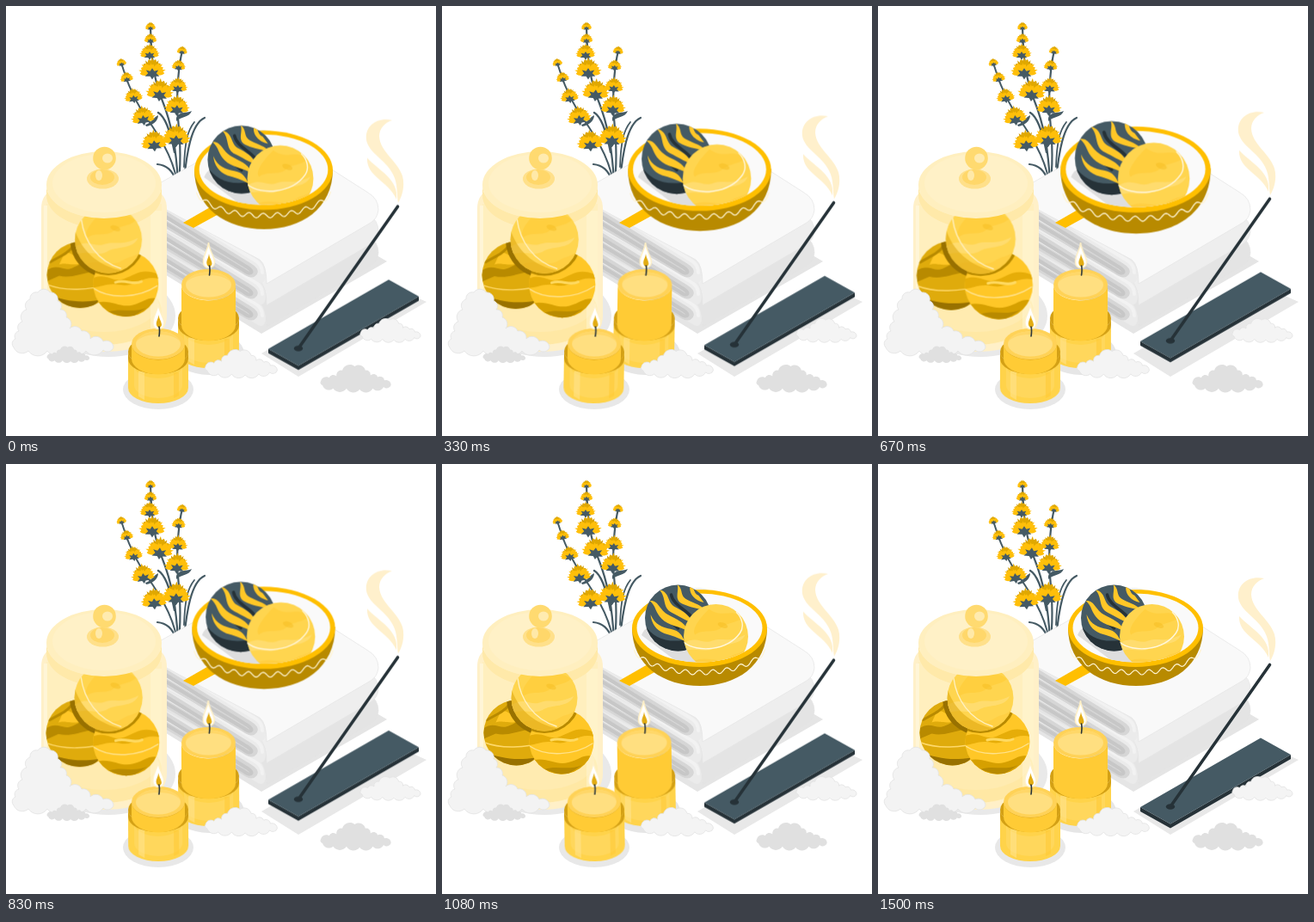
An HTML page that plays this animation: 500 px wide and 500 px high, repeating every 1.54 s.

```html
<!DOCTYPE html>
<html lang="en">
<head>
<meta charset="utf-8">
<title>Spa still life</title>
<style>
html, body { margin: 0; width: 100%; height: 100%; overflow: hidden; background: #fff; }
svg { display: block; width: 500px; height: 500px; }
#bowl { transform-origin: 299.5px 199px; }
#balls { transform-origin: 112.5px 294px; }
#tall { transform-origin: 235.5px 349px; }
#small { transform-origin: 177px 404px; }
</style>
</head>
<body>
<svg id="stage" viewBox="0 0 500 500" xmlns="http://www.w3.org/2000/svg"></svg>
<script>
const Y = '#ffc727', LIGHT = '#ffd54f', PALE = '#fff0c8', DARK = '#b88a00', SLATE = '#455a64', INK = '#263238';

const path = (d, fill, more = '') => `<path d="${d}" fill="${fill}" ${more}/>`;
const line = (d, color, w, more = '') =>
  path(d, 'none', `stroke="${color}" stroke-width="${w}" stroke-linecap="round" stroke-linejoin="round" ${more}`);
const oval = (x, y, rx, ry, fill, more = '') =>
  `<ellipse cx="${x}" cy="${y}" rx="${rx}" ry="${ry}" fill="${fill}" ${more}/>`;
const group = (id, body) => `<g id="${id}">${body}</g>`;

// Upright cylinder side, closed by half ellipses
const tube = (x, top, bottom, rx, ry, fill, more) =>
  path(`M${x - rx} ${top}V${bottom}A${rx} ${ry} 0 0 0 ${x + rx} ${bottom}V${top}A${rx} ${ry} 0 0 1 ${x - rx} ${top}Z`, fill, more);

// Sphere with its markings drawn around its own centre
const ball = (id, x, y, r, fill, marks) =>
  `<clipPath id="${id}"><circle r="${r}"/></clipPath>
   <g transform="translate(${x} ${y})"><circle r="${r}" fill="${fill}"/><g clip-path="url(#${id})">${marks}</g></g>`;

// Row of bumps through [dx, dy] steps
const cloud = (x, y, steps, fill, edge) =>
  path(`M${x} ${y}` + steps.map(([dx, dy]) => {
    const r = Math.hypot(dx, dy) * .6;
    return `a${r} ${r} 0 0 1 ${dx} ${dy}`;
  }).join('') + 'Z', fill, edge ? 'stroke="#e2e2e2" stroke-width=".8"' : '');

const flower = ([x, y, s, turn = 0]) => {
  const petal = (a, fill, k = 1) =>
    path('M0 0C-4-4-5-9-3-12L-1-11L0-14L1-11L3-12C5-9 4-4 0 0', fill, `transform="translate(0 6) rotate(${a}) scale(${k})"`);
  return `<g transform="translate(${x} ${y}) rotate(${turn}) scale(${s})">` +
    [-28, 26].map(a => petal(a, '#d19c00')).join('') + petal(0, '#e0a800', 1.12) +
    [-78, 76, -50, 48].map(a => petal(a, '#ffbf0a', .96)).join('') + petal(-8, '#ffbf0a', .72) +
    path('M0 12L-2 9L-7 9L-4 6L-6 3L-2 4L0 1L2 4L6 3L4 6L7 9L2 9Z', SLATE) + '</g>';
};

const lavender = () =>
  line('M168 25C169 65 173 88 181 108C194 140 198 170 200 204', SLATE, 2.2) +
  line('M134 66C139 82 145 101 158 122C176 148 193 172 199 204', SLATE, 2) +
  line('M205 52C200 72 199 94 199 120C202 150 204 175 201 204', SLATE, 2.2) +
  line('M207 203C210 172 215 137 231 130', SLATE, 2.2) +
  line('M207 187C208 158 211 145 219 135', SLATE, 1.8) +
  line('M198 203C193 191 187 185 176 184', SLATE, 2.2) +
  line('M196 170C191 145 184 128 177 124', SLATE, 2.4) +
  path('M198 130C202 122 209 125 216 122C213 130 204 128 198 134Z', SLATE) +
  path('M162 138C168 137 171 130 177 127C177 134 170 139 163 140Z', SLATE) +
  [[168, 23, .5], [168, 37, .6], [167, 52, .9], [170, 71, 1.2], [179, 96, 1.25, 4],
   [134, 65, .48, -10], [140, 82, .62, -10], [148, 103, .85, -8], [159, 126, 1.1, -8], [172, 155, 1.2, -4],
   [205, 51, .5, 8], [201, 68, .65, 6], [200, 91, .9, 4], [199, 114, 1.15, 3], [198, 149, 1.3, 2]].map(flower).join('');

const towel = (dy, face) => `<g transform="translate(0 ${dy})">` +
  path('M160 214L178 222L296 295Q303 301 302 312Q302 325 293 321L176 252Z', '#ebebeb') +
  line('M176 237L283 303Q291 308 288 310Q286 314 276 307L176 248', '#d6d6d6', 8) +
  line('M176 239L281 304Q287 308 285 310Q283 312 276 307L176 247', '#c7c7c7', 4) +
  line('M176 226L290 296Q298 301 298 310', '#f2f2f2', 4) +
  path('M166 226Q158 219 168 212L282 148Q300 140 316 150L421 217Q433 224 433 237Q432 247 424 252L303 323Q303 301 295 295Z',
    face, 'stroke="#e4e4e4" stroke-width=".7"') + '</g>';

const towels = () =>
  path('M165 300L297 381L443 297L426 287L300 250Z', '#e5e5e5') +
  towel(50, '#e4e4e4') + towel(25, '#eeeeee') + towel(0, '#f9f9f9') +
  path('M206 252L218 258L260 235L246 229Z', '#ffbf00');

const wave = () => {
  let d = '';
  for (let i = 0; i <= 120; i++) {
    const u = i / 60 - 1, x = 299.5 + 76 * u;
    const y = 207.5 + 35 * Math.sqrt(1 - .93 * u * u) + 2.7 * Math.sin(i * .5);
    d += (i ? 'L' : 'M') + x.toFixed(1) + ' ' + y.toFixed(1);
  }
  return line(d, '#fff4d2', 1.2);
};

const paleMarks = path('M-8-32C8-20 18-34 31-22C24-15 14-17 6-10C-2-3-16-9-24-2C-28-6-24-16-8-32Z', '#ffcc36', 'opacity=".6"') +
  path('M-38 8C-22-2-16 10-4 5C8 1 14 8 34-2C28 12 8 7-2 14C-14 20-24 11-38 18Z', '#ffe07d', 'opacity=".7"') +
  path('M-28 30C-12 20 2 33 16 24C25 18 30 21 38 12V40H-28Z', '#ffcb3c', 'opacity=".6"') +
  oval(3, -15, 6, 3, '#f6be23', 'transform="rotate(20)" opacity=".5"');

const bowl = () =>
  path('M221 190C221 235 258 258 300 258S378 235 378 190Z', DARK) + wave() +
  oval(299.5, 191, 78.5, 45, '#ffbf00') + oval(299.5, 190.5, 73, 40, '#fafafa') +
  `<clipPath id="inside"><path d="M200 90H400V190.5H372.5A73 40 0 0 1 226.5 190.5H200Z"/></clipPath><g clip-path="url(#inside)">` +
  path('M232 199C236 188 248 184 270 187L325 211L342 231L280 235Z', '#dedede') +
  ball('dark', 274.5, 179, 38.5, SLATE,
    path('M-40 6C-30 23-14 30 12 25L14 42H-40Z', INK) +
    line('M-21-6C-16 2-8 4 0 12M-8-27C-6-16 8-10 14-3', INK, 3.5) +
    path('M-33-20C-23-21-22-10-12-4S6 3 13 16C0 9-11 9-19 1S-25-13-33-20Z', Y) +
    path('M-22-33C-9-30-13-18-4-13S12-5 17 6C7 2 1-2-7-6C-19-12-13-24-22-33Z', Y) +
    path('M-1-39C7-33 1-26 11-21S25-16 32-9C23-11 15-12 6-16C-6-21 2-31-1-39Z', Y) +
    path('M14-38C20-36 17-29 24-26L30-18C20-20 12-28 14-38Z', Y) +
    path('M-32-4C-27 8-18 11-8 13S4 20 8 27C0 23-8 20-16 18C-26 14-31 6-32-4Z', Y)) +
  ball('pale', 318.5, 200.5, 37.5, LIGHT, paleMarks +
    line('M-37 7C-22 19 13 17 28-4C33-11 31-21 24-28', '#fff6d9', 1.4)) + '</g>';

const jarBalls = () =>
  ball('left', 86.5, 312.5, 38, '#dfab0c',
    path('M-40-4C-27-14-21-5-12-7S4-18 15-12L38-18V-4C24 0 20-5 10-3S-12 4-24 1L-40 8Z', DARK) +
    path('M-40 22C-18 29-4 33 22 29L10 42H-34Z', '#987100') +
    path('M-18-25C-9-27-8-19 3-20S5-12-6-12-18-14-24-12Z', Y) +
    line('M-34-15C-22-22-15-24-8-33', DARK, 3) +
    oval(32.5, -40, 44, 43, '#987100') +
    line('M-38 11C-18 19 10 18 36 10', '#ffd96a', 1.4)) +
  ball('right', 139, 323, 37.5, Y,
    path('M-38-7C-20-13-16-1-2-6S18-19 38-11V-6C20-11 10 4-6 1S-26 3-38 4Z', '#e6ad08') +
    path('M-33 21C-14 18-7 28 8 24S24 14 38 17L22 40H-22Z', '#d6a000') +
    path('M-20 32C-6 27 8 34 24 27L4 40Z', DARK) +
    oval(-20, -51, 42, 41, DARK) +
    line('M-37 5C-18 18 15 16 36 2', '#ffe28a', 1.4) +
    line('M-12-2C0-6 8 2 18-3', '#ffda61', 3)) +
  ball('top', 119, 272, 38.5, LIGHT, paleMarks +
    path('M-40-16C-33 10-15 30 18 36L0 42H-40Z', '#e0ab12', 'opacity=".6"') +
    line('M-31-23C-28 2-12 25 14 33', '#fff0bd', 1.4));

const jarBack = () =>
  oval(119, 360, 78, 48, '#e9e9e9') +
  path('M41 236Q41 217 57 214H170Q187 217 187 236V360C187 386 158 402 114 402S41 386 41 360Z', PALE) +
  path('M47 230H181V357C181 381 153 394 114 394S47 381 47 357Z', '#ffefbe') +
  oval(114, 355, 67, 39, '#ffe8a4') + oval(114, 346, 63, 33, '#ffebb0') +
  path('M44 232H48V374L44 367Z', '#fff7df', 'opacity=".65"') +
  path('M168 238H181V363L168 379Z', '#fff5d7', 'opacity=".45"') +
  tube(114, 208, 220, 67, 39, '#ffe9a9');

const lid = () =>
  oval(114, 208, 67, 39, '#ffefbf') + oval(114, 206, 60, 34, '#fff1c7') +
  oval(112.5, 201, 18.5, 11.5, '#ffe08a') + oval(112, 199, 14, 9, '#ffd76a') +
  oval(114.5, 177, 13.3, 13.3, '#ffda70') +
  oval(118, 177, 6, 5.5, '#ffebb0') + oval(108, 197, 4, 6, '#ffe9a8');

const flame = (x, y) => `<g transform="translate(${x} ${y})">` +
  path('M0 0C-1 11-7 15-6 24C-5 31 6 32 7 23C7 16 1 11 0 0Z', '#fff', 'stroke="#fff0c6" stroke-width="1.5"') +
  path('M.5 13C0 18-3 21-2 25C-1 29 3 29 4 25C4 21 1 18 .5 13Z', '#e2ac13') +
  line('M1 27Q2 31 1 38', INK, 1.6) + '</g>';

const candle = (id, x, top, rim, bottom, rx, tip) => group(id,
  tube(x, rim - 8, bottom, rx, 18, '#ffd34a') +
  tube(x, rim + 8, bottom - 3, rx - 7, 15, '#ffd75c') +
  path(`M${x - rx + 12} ${rim + 15}h7V${bottom + 14}l-7-4Z`, '#ffe595', 'opacity=".5"') +
  path(`M${x + rx - 17} ${rim + 16}h6V${bottom + 9}l-6 3Z`, '#ffca35', 'opacity=".6"') +
  oval(x, rim - 8, rx, 18, '#d3a015') +
  tube(x, rim - 8, rim, rx, 18, '#d3a015') +
  tube(x, top, rim, rx - 4, 18.5, '#ffcb35') +
  oval(x, top, rx - 4, 18, '#ffd257') + oval(x, top, rx - 9, 14.5, '#ffdf80') +
  path(`M${x - rx + 9} ${top}a${rx - 9} 14.5 0 0 1 ${2 * rx - 18} 0a${rx - 9} 11 0 0 0 ${18 - 2 * rx} 0Z`, '#ffd768') +
  flame(x, tip));

const incense = () =>
  path('M305 399L340 418.5L480 338V343L340 423.5L305 404Z', INK) +
  path('M305 399L445 318.5L480 338L340 418.5Z', SLATE) +
  oval(340, 398.5, 5.2, 3.3, INK) +
  line('M341 397L455.5 233.5', INK, 3.6) +
  path('M449 133C430 129 417 141 419 156C422 172 441 178 450 196C456 207 454 219 456 229C461 221 464 209 461 198C456 181 435 170 434 152C434 142 441 136 449 133Z', '#fff0cc') +
  path('M420 177C419 199 444 203 454 225C457 202 434 192 420 177Z', '#fff0cc');

const puffs = (x, y, s, fill, edge) => cloud(x, y,
  [[-2, -5], [10, -4], [9, -2], [7, -7], [15, -5], [13, 5], [6, 6], [9, 2], [8, 4], [8, 6], [-9, 2], [-13, 2], [-16, 1], [-16, -1], [-16, 0], [-13, -4]]
    .map(p => p.map(v => v * s)), fill, edge);

const clouds = () =>
  cloud(9, 397, [[2, -10], [4, -9], [4, -11], [5, -14], [4, -12], [9, -8], [14, 0], [9, 10], [3, 10], [7, 9], [4, 13], [14, 3], [10, 9], [15, 3], [12, 7],
    [-12, 3], [-20, 1], [-23, -1], [-22, 1], [-22, 0], [-17, -4]], '#f3f3f3', true) +
  puffs(49, 410, .58, '#e0e0e0') +
  puffs(234, 424, .98, '#f4f4f4', true) +
  puffs(414, 384, .82, '#f4f4f4', true) +
  puffs(368, 441, .96, '#e0e0e0');

document.getElementById('stage').innerHTML =
  path('M297 404L440 322L489 344L340 431Z', '#e8e8e8') +
  lavender() + towels() + group('bowl', bowl()) +
  jarBack() + group('balls', jarBalls()) + lid() +
  oval(236, 404, 41, 25, '#e6e6e6') + candle('tall', 235.5, 324, 371, 403, 35.5, 275) +
  oval(177, 446, 41, 23, '#e8e8e8') + candle('small', 177, 393, 410, 444, 35, 346) +
  group('incense', incense()) + clouds();

// Motion tables: [ms, value], linear between steps
const LOOP = 1540;
const beat = [[0, .13], [130, 1], [430, 0], [580, 0], [730, 1], [880, 0], [LOOP, 0]];
const sway = [[0, .05], [355, 1], [1105, -1], [1480, 0], [LOOP, 0]];
const lift = [[0, .03], [730, 1], [1480, 0], [LOOP, 0]];

const play = (id, steps, pose) => document.getElementById(id).animate(
  steps.map(([ms, v]) => ({ offset: ms / LOOP, transform: pose(v) })),
  { duration: LOOP, iterations: Infinity });

play('bowl', beat, v => `scale(${1 + .185 * v})`);
play('balls', beat, v => `scale(${1 + .09 * v})`);
play('tall', sway, v => `rotate(${v}deg)`);
play('small', sway, v => `rotate(${v}deg)`);
play('incense', lift, v => `translateY(${-10 * v}px)`);
</script>
</body>
</html>
```
